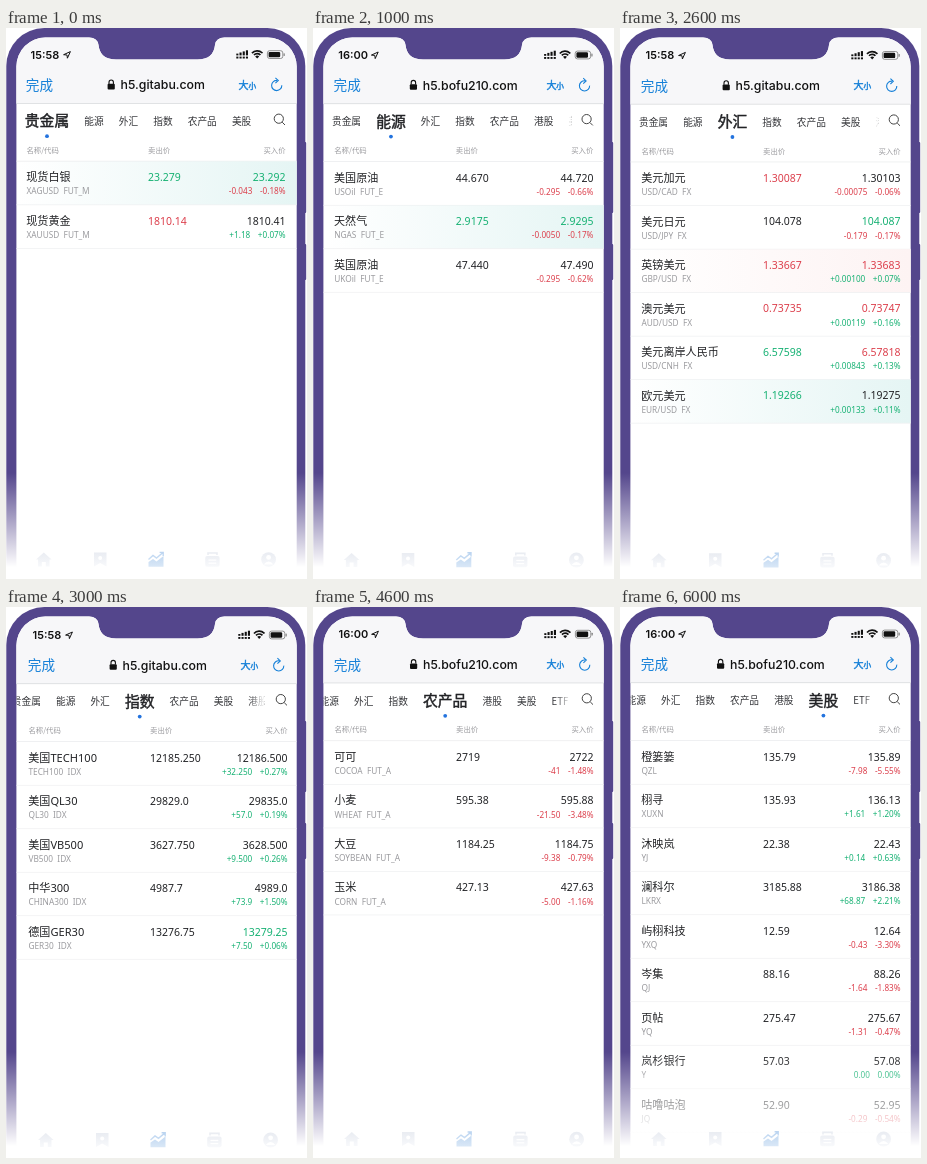
These frames come from a looping animation (301 by 551 pixels, 7000 ms). An HTML page with a canvas:

```html
<!DOCTYPE html>
<html lang="zh-CN">
<head>
<meta charset="utf-8">
<title>行情</title>
<style>
html, body { margin: 0; width: 100%; height: 100%; overflow: hidden; background: #fff; }
canvas { display: block; width: 301px; height: 551px; }
</style>
</head>
<body>
<canvas id="stage"></canvas>
<script>
const W = 301, H = 551, SLIDE_MS = 1000;
const canvas = document.getElementById('stage');
const ctx = canvas.getContext('2d');
const scale = Math.max(1, window.devicePixelRatio || 1);
canvas.width = W * scale;
canvas.height = H * scale;

const SANS = '"Noto Sans", "Noto Sans CJK SC", "Noto Sans CJK", sans-serif';
const CJK = '"Noto Sans CJK SC", "Noto Sans CJK", sans-serif';
const UI = 'Inter, sans-serif';
const INK = '#222326', BLUE = '#1680d8', GREY = '#9b9b9f', FRAME = '#54468c';
const GREEN = '#16b173', RED = '#dc3f4c';
const TONES = { k: INK, g: GREEN, r: RED };
const GLOWS = { G: '229,245,244', R: '253,243,243' };

const EARLY = ['贵金属', '能源', '外汇', '指数', '农产品', '美股', '港股'];
const LATE = ['贵金属', '能源', '外汇', '指数', '农产品', '港股', '美股', 'ETF'];

// Row: name | code | sell | buy | change | percent | sell tone, buy tone, glow
const slides = [
  { clock: '15:58', active: 0, start: 18.8, dx: 0, dy: 0, rows: [
    '现货白银|XAGUSD  FUT_M|23.279|23.292|-0.043|-0.18%|ggG',
    '现货黄金|XAUUSD  FUT_M|1810.14|1810.41|+1.18|+0.07%|rk'] },
  { clock: '16:00', active: 1, start: 19, dx: 0.8, dy: 0.4, rows: [
    '美国原油|USOil  FUT_E|44.670|44.720|-0.295|-0.66%',
    '天然气|NGAS  FUT_E|2.9175|2.9295|-0.0050|-0.17%|ggG',
    '英国原油|UKOil  FUT_E|47.440|47.490|-0.295|-0.62%'] },
  { clock: '15:58', active: 2, start: 19, dx: 1, dy: 0.8, rows: [
    '美元加元|USD/CAD  FX|1.30087|1.30103|-0.00075|-0.06%|rk',
    '美元日元|USD/JPY  FX|104.078|104.087|-0.179|-0.17%|kg',
    '英镑美元|GBP/USD  FX|1.33667|1.33683|+0.00100|+0.07%|rrR',
    '澳元美元|AUD/USD  FX|0.73735|0.73747|+0.00119|+0.16%|rr',
    '美元离岸人民币|USD/CNH  FX|6.57598|6.57818|+0.00843|+0.13%|gr',
    '欧元美元|EUR/USD  FX|1.19266|1.19275|+0.00133|+0.11%|gkG'] },
  { clock: '15:58', active: 3, start: 5.8, dx: 2, dy: 1.4, rows: [
    '美国TECH100|TECH100  IDX|12185.250|12186.500|+32.250|+0.27%',
    '美国QL30|QL30  IDX|29829.0|29835.0|+57.0|+0.19%',
    '美国VB500|VB500  IDX|3627.750|3628.500|+9.500|+0.26%',
    '中华300|CHINA300  IDX|4987.7|4989.0|+73.9|+1.50%',
    '德国GER30|GER30  IDX|13276.75|13279.25|+7.50|+0.06%|kg'] },
  { clock: '16:00', active: 4, start: -37.6, dx: 1, dy: 0.6, rows: [
    '可可|COCOA  FUT_A|2719|2722|-41|-1.48%',
    '小麦|WHEAT  FUT_A|595.38|595.88|-21.50|-3.48%',
    '大豆|SOYBEAN  FUT_A|1184.25|1184.75|-9.38|-0.79%',
    '玉米|CORN  FUT_A|427.13|427.63|-5.00|-1.16%'] },
  { clock: '16:00', active: 5, start: -36.4, dx: 2, dy: 0.9, rows: [
    '砚禾通讯|99763|20.20|20.25|-0.04|-0.20%',
    '沐山锅|96862|51.55|51.60|-0.45|-0.86%',
    '岚川移动|99941|47.60|47.65|-0.15|-0.31%',
    '禾屿保险|91299|88.72|88.77|-0.85|-0.95%',
    '岑澜汽车|99175|22.67|22.69|-0.15|-0.66%',
    '杉岭人寿|92628|18.46|18.48|+0.52|+2.90%',
    '砚川康宁|92318|91.70|91.75|+0.95|+1.05%',
    '霁禾控股|99700|586.15|586.35|+0.50|+0.09%',
    '青栩集团－W|91810|26.02|26.04|-0.50|-1.88%'] },
  { clock: '16:00', active: 6, start: -37.6, dx: 1, dy: 0.4, rows: [
    '橙篓篓|QZL|135.79|135.89|-7.98|-5.55%',
    '栩寻|XUXN|135.93|136.13|+1.61|+1.20%',
    '沐映岚|YJ|22.38|22.43|+0.14|+0.63%',
    '澜科尔|LKRX|3185.88|3186.38|+68.87|+2.21%',
    '屿栩科技|YXQ|12.59|12.64|-0.43|-3.30%',
    '岑集|QJ|88.16|88.26|-1.64|-1.83%',
    '页帖|YQ|275.47|275.67|-1.31|-0.47%',
    '岚杉银行|Y|57.03|57.08|0.00|0.00%',
    '咕噜咕泡|JQ|52.90|52.95|-0.29|-0.54%'] }
];

function text(str, x, y, font, color, align = 'left') {
  ctx.font = font;
  ctx.fillStyle = color;
  ctx.textAlign = align;
  ctx.fillText(str, x, y);
  return ctx.measureText(str).width;
}

// Regular weight thickened by a hairline, between regular and bold.
function mediumText(str, x, y, font, color) {
  const w = text(str, x, y, font, color);
  ctx.strokeStyle = color;
  ctx.lineWidth = 0.45;
  ctx.strokeText(str, x, y);
  return w;
}

function rect(x, y, w, h, color) {
  ctx.fillStyle = color;
  ctx.fillRect(x, y, w, h);
}

function round(x, y, w, h, r, color) {
  ctx.beginPath();
  ctx.roundRect(x, y, w, h, r);
  ctx.fillStyle = color;
  ctx.fill();
}

function dot(x, y, r, color) {
  ctx.beginPath();
  ctx.arc(x, y, r, 0, Math.PI * 2);
  ctx.fillStyle = color;
  ctx.fill();
}

function stroke(path, color, width) {
  ctx.strokeStyle = color;
  ctx.lineWidth = width;
  ctx.stroke(new Path2D(path));
}

function fill(path, color) {
  ctx.fillStyle = color;
  ctx.fill(new Path2D(path));
}

function linear(x0, y0, x1, y1, from, to) {
  const g = ctx.createLinearGradient(x0, y0, x1, y1);
  g.addColorStop(0, from);
  g.addColorStop(1, to);
  return g;
}

const screen = new Path2D(
  'M10.4 551 V38.5 A29 29 0 0 1 39.4 9.5 H83 Q91.5 9.5 92.5 17 Q94 31.5 110 31.5 ' +
  'H191.5 Q207.5 31.5 209 17 Q210 9.5 218.5 9.5 H261.7 A29 29 0 0 1 290.7 38.5 V551 Z');

function drawFrame() {
  rect(0, 0, W, H, '#fff');
  round(297, 114, 3.2, 71, 1, FRAME);
  round(297, 216, 3.2, 36, 1, FRAME);
  round(0.3, 0, 299, 620, 38, FRAME);
  ctx.fillStyle = '#fff';
  ctx.fill(screen);
}

function drawStatus(clock) {
  text(clock, 24.5, 30.6, '600 11px ' + UI, '#111');
  stroke('M57.6 26.7 L64.4 23.6 L61.4 30.2 L61 27 Z', '#111', 1);
  for (let i = 0; i < 4; i++) {
    const h = 1.8 + i * 1.1;
    rect(230.3 + i * 3.2, 27.4 - h, 2.1, h, '#111');
    rect(230.3 + i * 3.2, 28.6, 2.1, 1.9, '#111');
  }
  for (const r of [4.4, 7.2]) {
    ctx.beginPath();
    ctx.arc(251.2, 30, r, -Math.PI * 0.76, -Math.PI * 0.24);
    ctx.strokeStyle = '#111';
    ctx.lineWidth = 1.7;
    ctx.stroke();
  }
  fill('M251.2 30.6 L249.2 28.4 Q251.2 26.8 253.2 28.4 Z', '#111');
  ctx.beginPath();
  ctx.roundRect(261.4, 22.7, 15.4, 7.8, 2.2);
  ctx.strokeStyle = '#777';
  ctx.lineWidth = 0.8;
  ctx.stroke();
  round(262.6, 23.9, 11.6, 5.4, 1.2, '#111');
  round(277.6, 25.2, 1.1, 2.8, 0.5, '#777');
}

function drawAddress(late) {
  const url = late ? 'h5.bofu210.com' : 'h5.gitabu.com';
  const x = late ? 109 : 114.6;
  text('完成', 19.8, 62, '13.6px ' + CJK, BLUE);
  text(url, x, 61.2, '500 12.3px ' + UI, '#111');
  round(x - 13, 55.8, 7.2, 5.6, 1, '#111');
  stroke(`M${x - 11.6} 56 V54.2 a2.2 2.2 0 0 1 4.4 0 V56`, '#111', 1.1);
  mediumText('大', 232.6, 60.6, '10px ' + CJK, BLUE);
  mediumText('小', 242.4, 60.6, '7.6px ' + CJK, BLUE);
  stroke('M271.2 52.4 A5.1 5.1 0 1 0 275.8 57.2 M269.4 49.8 L272.3 52.5 L269.4 55.2', BLUE, 1.1);
}

function drawTabs({ clock, active, start, dx, dy }) {
  const tabs = clock === '16:00' ? LATE : EARLY;
  let x = start;
  ctx.save();
  ctx.beginPath();
  ctx.rect(10.5, 78, 248, 36);
  ctx.clip();
  tabs.forEach((label, i) => {
    const on = i === active;
    const w = on
      ? mediumText(label, x, 98.4 + dy, '14.8px ' + CJK, INK)
      : text(label, x, 96.9 + dy, '9.7px ' + CJK, '#333438');
    if (on) dot(x + w / 2, 108.2 + dy, 1.9, '#2373de');
    x += w + 15.1;
  });
  rect(242, 80, 18, 28, linear(242, 0, 259, 0, 'rgba(255,255,255,0)', '#fff'));
  ctx.restore();
  ctx.save();
  ctx.translate(dx, dy);
  ctx.beginPath();
  ctx.arc(272.8, 90.7, 4.6, 0, Math.PI * 2);
  ctx.strokeStyle = '#444';
  ctx.lineWidth = 1;
  ctx.stroke();
  stroke('M276.2 94.2 L279 97', '#444', 1);
  ctx.restore();
}

function drawRow(row, i) {
  const [name, code, sell, buy, change, percent, tone = 'kk'] = row.split('|');
  const top = 133.3 + i * 43.5, right = 279.6;
  const glow = GLOWS[tone[2]];
  if (glow) rect(8, top, 284, 43.5, linear(12, 0, 288, 0, `rgba(${glow},0)`, `rgb(${glow})`));
  rect(8, top + 43.2, 284, 0.7, '#eeeff1');

  text(name, 20.2, top + 20, '11.1px ' + SANS, INK);
  text(code, 20.4, top + 33.1, '8.3px ' + SANS, GREY);
  text(sell, 142, top + 19.8, '500 10.5px ' + SANS, TONES[tone[0]]);
  text(buy, right, top + 19.8, '500 10.5px ' + SANS, TONES[tone[1]], 'right');

  const color = change[0] === '-' ? RED : GREEN;
  const font = '500 8.2px ' + SANS;
  const w = text(percent, right, top + 33.1, font, color, 'right');
  text(change, right - w - 7.6, top + 33.1, font, color, 'right');
}

function drawList(rows) {
  const font = '7.4px ' + CJK;
  text('名称/代码', 20.4, 124.8, font, GREY);
  text('卖出价', 142, 124.8, font, GREY);
  text('买入价', 279.6, 124.8, font, GREY, 'right');
  rect(8, 132.8, 284, 0.7, '#e9eaec');
  rows.forEach(drawRow);
}

function drawNav() {
  const pale = linear(0, 523, 0, 540, '#e8ebf1', '#f9fafc');
  const lit = linear(0, 523, 0, 540, '#b9d3f0', '#dce9f7');
  fill('M30 531.5 L37.8 524.5 L45.6 531.5 H43.5 V538.5 H39.8 V534 H35.8 V538.5 H32.1 V531.5 Z', pale);
  fill('M88 524.5 H100.5 V538.5 L94.2 535 L88 538.5 Z', pale);
  dot(94.2, 530, 2, '#fff');
  fill('M142.5 538.8 V534 L147 531 L150.5 533.5 L157.5 528 V538.8 Z', lit);
  stroke('M142.5 531.5 L147 527.5 L150.5 530 L157 524.5 M153.6 524.4 H157.2 V528', lit, 1.4);
  round(199.2, 528, 14.4, 10.8, 2, pale);
  stroke('M202 527 V525 H211 V527', pale, 1.6);
  rect(202.5, 531.5, 7.8, 1.2, '#fff');
  rect(202.5, 534.6, 7.8, 1.2, '#fff');
  dot(262.6, 531.6, 7.4, pale);
  dot(262.6, 529.4, 2.4, '#fff');
  fill('M257.8 536.6 Q262.6 530.6 267.4 536.6 Z', '#fff');
}

function render() {
  const slide = slides[Math.floor(performance.now() / SLIDE_MS) % slides.length];
  const { dx, dy } = slide;
  ctx.setTransform(scale, 0, 0, scale, 0, 0);
  drawFrame();

  ctx.save();
  ctx.clip(screen);
  rect(8, 0, 285, 75.4 + dy, '#f7f7f9');
  rect(8, 75 + dy, 285, 0.7, '#d5d7da');
  drawTabs(slide);
  ctx.translate(dx, dy);
  drawStatus(slide.clock);
  drawAddress(slide.clock === '16:00');
  drawList(slide.rows);
  ctx.restore();

  rect(0, 445, W, H - 445, linear(0, 445, 0, 539, 'rgba(255,255,255,0)', '#fff'));
  ctx.save();
  ctx.translate(dx, dy);
  drawNav();
  ctx.restore();
  requestAnimationFrame(render);
}
render();
</script>
</body>
</html>
```
